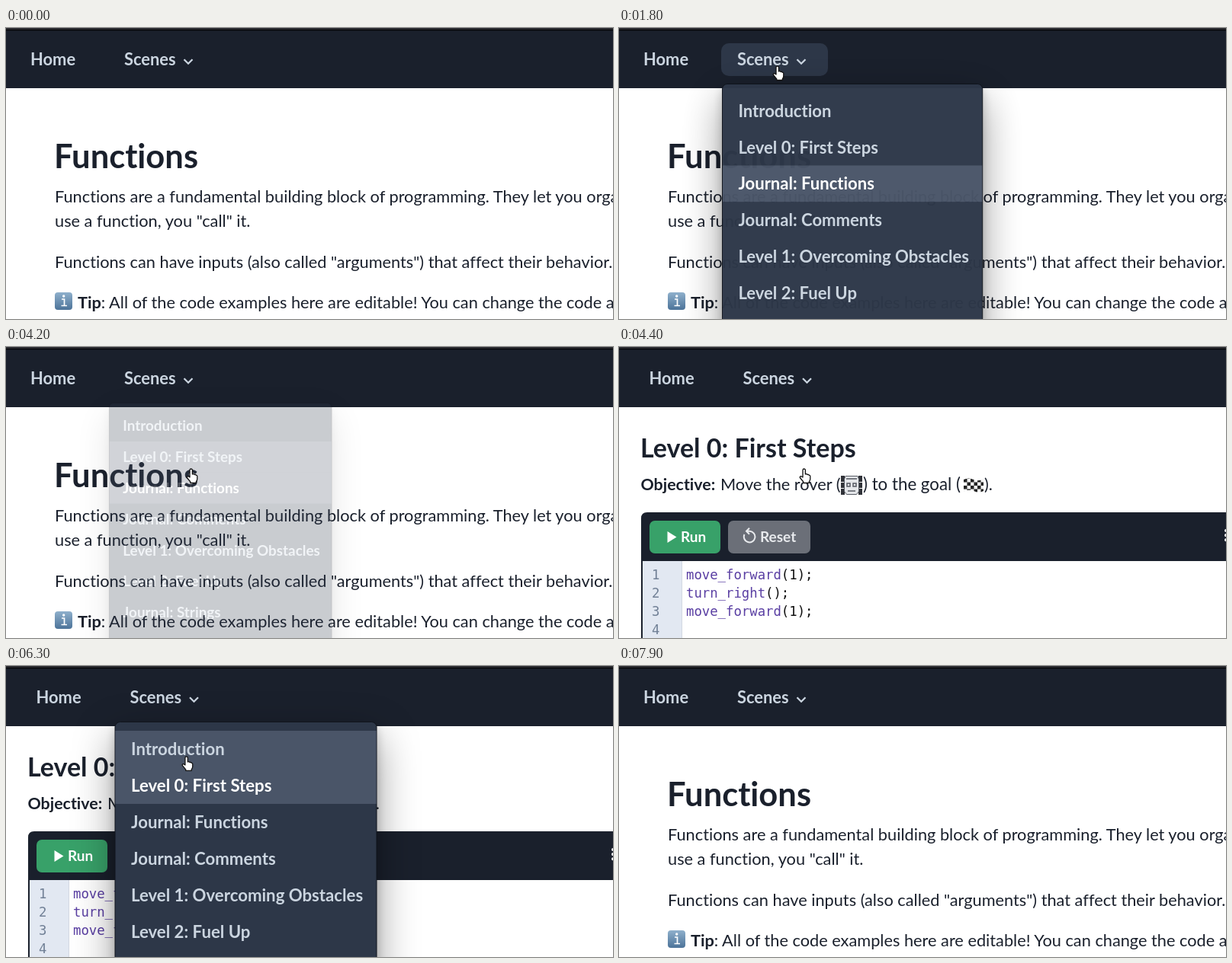
An HTML page for the animation above (8 s loop, 796 by 382 pixels).

```html
<!DOCTYPE html>
<html lang="en">
<head>
<meta charset="utf-8">
<title>Scene menu</title>
<style>
  html, body { margin: 0; width: 100%; height: 100%; overflow: hidden; background: #fff; }
  body { position: relative; font: 21.75px Lato, sans-serif; font-variant-ligatures: none; }
  svg { position: absolute; left: 0; top: 0; }
  text { fill: #1a202c; white-space: pre; }
  .bold { font-weight: 700; }
  .nav text { font-size: 21.9px; font-weight: 700; fill: #cbd5e0; }
  .button { font-size: 19px; font-weight: 700; }
  .code text { font: 17.3px "DejaVu Sans Mono", monospace; fill: #111; }
  .code .call { fill: #5a3fa3; }
  .code .number { fill: #718096; }
  #menu {
    position: absolute; left: 134.5px; top: 73px; width: 344px; height: 420px;
    box-sizing: border-box; padding-top: 11px; border: 1px solid #10141c; border-radius: 7px;
    background: #2d3748; color: #cbd5e0; font-size: 22.2px; font-weight: 700;
    transform-origin: 0 0;
    box-shadow: 0 7px 14px rgba(0,0,0,.2), 0 20px 54px rgba(0,0,0,.4);
  }
  #menu div { height: 48px; line-height: 47px; padding-left: 20.5px; white-space: nowrap; }
  #menu .lit { background: #4a5568; }
  #menu .active { color: #fff; }
</style>
</head>
<body>
<svg width="796" height="382">
  <defs>
    <linearGradient id="blue" x2="0" y2="1">
      <stop stop-color="#8fb0cc"/><stop offset="1" stop-color="#4c7399"/>
    </linearGradient>
    <pattern id="checks" x="452" y="173" width="9" height="9" patternUnits="userSpaceOnUse">
      <path fill="#f4f4f4" d="M0 0h9v9H0z"/>
      <path fill="#222" d="M0 0h4.5v9H9V4.5H0z"/>
    </pattern>
  </defs>

  <g class="nav">
    <path fill="#1a202c" d="M0 0h796v79H0z"/>
    <path fill="#2b2c31" d="M0 0h796v2H0z"/>
    <path fill="#08090c" d="M0 2h796v1.5H0z"/>
    <g id="links">
      <rect id="hover" x="134" y="20" width="140" height="43" rx="10" fill="#2d3748"/>
      <text x="32" y="48.5">Home</text>
      <text x="155" y="48.5">Scenes</text>
      <path d="M233.5 41.2l5.5 5.5 5.5-5.5" fill="none" stroke="#cbd5e0" stroke-width="2.3"/>
    </g>
  </g>

  <g id="journal">
    <text class="bold" x="63" y="184" font-size="43.5">Functions</text>
    <text x="64" y="228.5">Functions are a fundamental building block of programming. They let you organize</text>
    <text x="64" y="260.5">use a function, you "call" it.</text>
    <text x="64" y="314.5">Functions can have inputs (also called "arguments") that affect their behavior.</text>
    <rect x="64" y="347" width="23" height="23" rx="4" fill="url(#blue)"/>
    <path d="M73 356h3.5v8.5m-4 0h7.5" fill="none" stroke="#fff" stroke-width="1.7"/>
    <circle cx="75.7" cy="352" r="1.7" fill="#fff"/>
    <text x="94" y="367.5"><tspan class="bold">Tip</tspan>: All of the code examples here are editable! You can change the code and</text>
  </g>

  <g id="level">
    <text class="bold" x="28" y="145" font-size="34">Level 0: First Steps</text>
    <text class="bold" x="28.5" y="187.5" font-size="21.4">Objective:</text>
    <text x="133" y="187.5">Move the rover (</text>
    <path fill="#303238" d="M291 169h5v8h-5zm0 9h5v7h-5zm0 8h5v8h-5zM314 169h5v8h-5zm0 9h5v7h-5zm0 8h5v8h-5z"/>
    <path fill="#e5e7ea" stroke="#555962" d="M297 169.5h16l1.5 4v16l-3 4h-13l-3-4v-16z"/>
    <path fill="none" stroke="#555962" stroke-width="1.5" d="M298 173h14M299 179h4v4h-4zm8 0h4v4h-4zM300 189h10"/>
    <text x="320" y="187.5" font-size="22.3">) to the goal (</text>
    <path fill="url(#checks)" d="M452 174q6-3 13 0t13-1v16q-6 3-13 0t-13 1z"/>
    <text x="479" y="187.5">).</text>

    <path fill="#1a202c" d="M29 382V225q0-8 8-8h759v165z"/>
    <rect x="40" y="228" width="93" height="43" rx="7" fill="#38a169"/>
    <path fill="#fff" d="M63.5 242l12 7.5-12 7.5z"/>
    <text class="button" x="81" y="255.5" style="fill:#fff">Run</text>
    <rect x="143" y="228" width="108" height="43" rx="7" fill="#6b6f78"/>
    <path d="M164.5 246a7.3 7.3 0 1 0 7-4.2h-4.5m4-4l-4 4 4 4" fill="none" stroke="#e8eaed" stroke-width="2"/>
    <text class="button" x="185" y="255.5" style="fill:#e8eaed">Reset</text>
    <path d="M796 241v.1m0 6v.1m0 6v.1" stroke="#fff" stroke-width="4" stroke-linecap="round"/>
    <path fill="#fff" d="M31 281h765v101H31z"/>
    <path fill="#e2e8f2" d="M31 281h51v101H31z"/>
    <path fill="#d3d8e2" d="M82 281h1v101h-1z"/>
    <g class="code" id="code"></g>
  </g>
</svg>

<div id="menu"></div>

<svg width="796" height="382">
  <g id="cursor" stroke-linejoin="round">
    <path id="hand" fill="#fff" stroke="#111" stroke-width="1.3"
      d="M-2 11V1.7a1.7 1.7 0 0 1 3.4 0V7q2-1 2.6.6 1.7-.8 2.2.8 1.6-.3 1.6 1.6v3q0 2-1.5 4v1.5h-7.5V17q-2.5-3-4.5-5.5-.2-2 1.7-1.7z"/>
    <path id="arrow" fill="#111" stroke="#fff" d="M0 0v15l3.5-3.5L6 17l2.3-1L6 10.7h5z"/>
  </g>
</svg>

<script>
const $ = id => document.getElementById(id);
const LOOP = 8000, STEP = 100, NAV_SHIFT = 7.5, ROW_TOP = 85, ROW_HEIGHT = 48;

const items = ["Introduction", "Level 0: First Steps", "Journal: Functions", "Journal: Comments",
  "Level 1: Overcoming Obstacles", "Level 2: Fuel Up", "Journal: Strings"];
$("menu").innerHTML = items.map(label => `<div>${label}</div>`).join("");
const rows = [...$("menu").children];

const calls = [["move_forward", "(1);"], ["turn_right", "();"], ["move_forward", "(1);"], ["", ""]];
$("code").innerHTML = calls.map(([name, rest], i) => {
  const y = 305 + 24 * i;
  return `<text class="number" x="43" y="${y}">${i + 1}</text>
    <text x="88" y="${y}"><tspan class="call">${name}</tspan>${rest}</text>`;
}).join("");

const easeOut = u => 1 - (1 - u) ** 3;
const easeIn = u => u * u;
const easeInOut = u => u * u * (3 - 2 * u);
const clamp = u => Math.min(1, Math.max(0, u));

// cubic-bezier(.4, 0, .2, 1)
function standardEase(x) {
  let low = 0, high = 1;
  for (let i = 0; i < 20; i++) {
    const s = (low + high) / 2;
    const at = 1.2 * s * (1 - s) ** 2 + 0.6 * s * s * (1 - s) + s ** 3;
    if (at < x) low = s; else high = s;
  }
  return low * low * (3 - 2 * low);
}

const moves = [
  { start: 500, end: 1300, from: [262, 400], to: [208, 50], ease: easeOut },
  { start: 2300, end: 2900, from: [208, 50], to: [243, 160], ease: easeInOut },
  { start: 5000, end: 5400, from: [243, 160], to: [207, 33], ease: easeInOut },
  { start: 5850, end: 6700, from: [207, 33], to: [262, 191], ease: easeInOut },
  { start: 7300, end: 7850, from: [262, 191], to: [300, 402], ease: easeIn }
];
const openings = [{ open: 1641, close: 4150 }, { open: 5700, close: 6950 }];

function menuAmount(t) {
  const span = openings.find(o => t >= o.open && t < o.close + 100);
  if (!span) return 0;
  return t < span.close
    ? standardEase(clamp((t - span.open) / 200))
    : (1 - (t - span.close) / 100) ** 2;
}

function draw(t) {
  const onLevel = t >= 4300 && t < 7050;
  const shift = onLevel ? NAV_SHIFT : 0;
  $("journal").style.display = onLevel ? "none" : "";
  $("level").style.display = onLevel ? "" : "none";
  $("links").setAttribute("transform", `translate(${shift})`);

  const move = moves.filter(m => t >= m.start).pop() || moves[0];
  const u = move.ease(clamp((t - move.start) / (move.end - move.start)));
  const [x, y] = move.from.map((a, i) => a + (move.to[i] - a) * u);
  const amount = menuAmount(t);
  const overButton = y > 20 && y < 63;
  const moving = t > move.start && t < move.end;
  const useArrow = moving && !amount && !overButton;
  $("cursor").setAttribute("transform", `translate(${x} ${y})`);
  $("arrow").style.display = useArrow ? "" : "none";
  $("hand").style.display = useArrow ? "none" : "";
  $("hover").style.display = overButton ? "" : "none";

  const menu = $("menu").style;
  menu.display = amount ? "" : "none";
  menu.opacity = amount;
  menu.transform = `translateX(${shift}px) scale(${0.8 + 0.2 * amount})`;
  const active = onLevel ? 1 : 2;
  const hovered = Math.floor((y - ROW_TOP) / ROW_HEIGHT);
  rows.forEach((row, i) => {
    row.classList.toggle("active", i === active);
    row.classList.toggle("lit", i === active || i === hovered);
  });
}

function tick() {
  const t = performance.now() % LOOP;
  draw(Math.floor(t / STEP) * STEP);
  requestAnimationFrame(tick);
}
tick();
</script>
</body>
</html>
```
